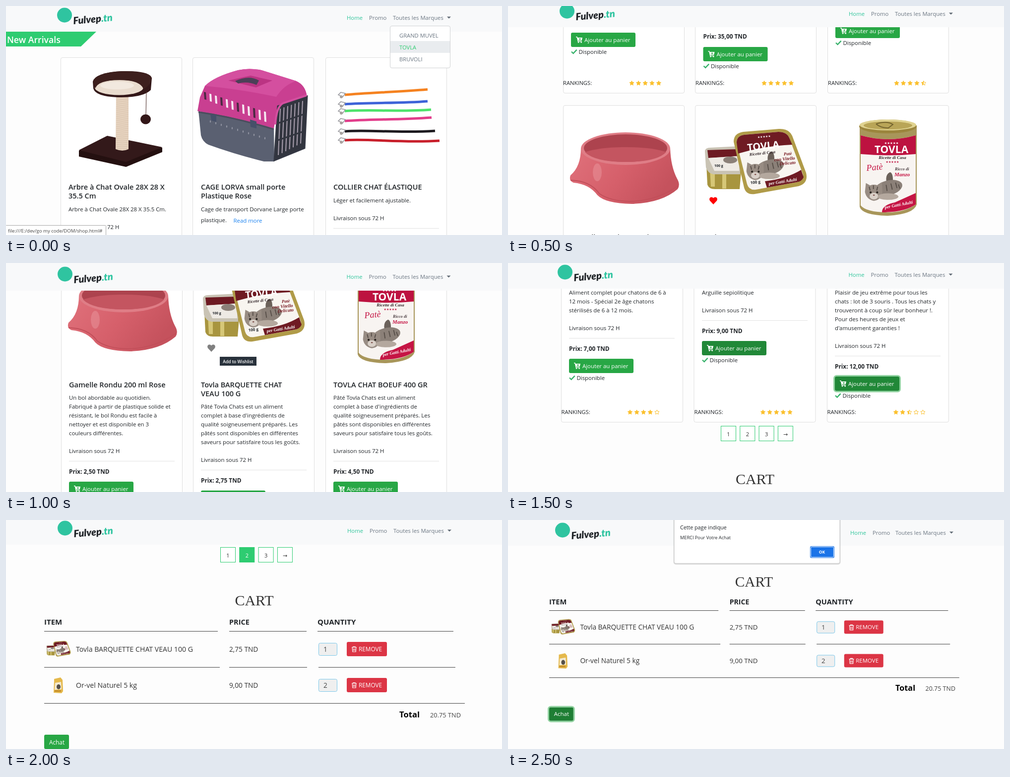
These frames come from a looping animation (1000x464 px, 3000 ms). An HTML page:

```html
<!DOCTYPE html>
<html lang="fr">
<head>
<meta charset="utf-8">
<title>Boutique pour animaux</title>
<style>
  html, body { margin: 0; width: 100%; height: 100%; overflow: hidden; background: #fdfdfd; }
  svg { display: block; width: 1000px; height: 464px; font-family: "Open Sans", "Noto Sans", "DejaVu Sans", sans-serif; fill: #212529; }
</style>
</head>
<body>
<svg id="stage" viewBox="0 0 1000 464"></svg>
<script>
const GREEN = '#28a745', DARK_GREEN = '#218838', MINT = '#2ecc71', TEAL = '#2fc4a0', GOLD = '#fbc02d';
const BOLD = 'font-weight="700"', SEMI = 'font-weight="600"', WHITE = 'fill="#fff"', MIDDLE = 'text-anchor="middle"';
const SERIF = 'font-family="Liberation Serif, serif"';

// Drawing helpers
const text = (x, y, str, size = 11.4, attrs = '') =>
  `<text x="${x}" y="${y}" font-size="${size}" ${attrs}>${str}</text>`;
const lines = (x, y, list, size, attrs) => list.map((s, i) => text(x, y + 18 * i, s, size, attrs)).join('');
const rect = (x, y, w, h, fill, r = 0, attrs = '') =>
  `<rect x="${x}" y="${y}" width="${w}" height="${h}" rx="${r}" fill="${fill}" ${attrs}/>`;
const path = (d, fill, attrs = '') => `<path d="${d}" fill="${fill}" ${attrs}/>`;
const stroke = (d, color, width = 1, attrs = '') => path(d, 'none', `stroke="${color}" stroke-width="${width}" ${attrs}`);
const ellipse = (x, y, rx, ry, fill, attrs = '') =>
  `<ellipse cx="${x}" cy="${y}" rx="${rx}" ry="${ry}" fill="${fill}" ${attrs}/>`;
const move = (x, y, body, more = '') => `<g transform="translate(${x} ${y}) ${more}">${body}</g>`;
const ring = (x, y, w, h) => rect(x - 1.5, y - 1.5, w + 3, h + 3, 'none', 5, 'stroke="#93d3a2" stroke-width="3"');
const repeat = (count, part) => Array.from({ length: count }, (_, i) => part(i)).join('');

// Page parts
function nav(base, height, logoX, homeX = 687) {
  const link = 'fill="#6b7682"', menuX = homeX + (homeX > 689 ? 91 : 93);
  return rect(0, 0, 1000, height, '#f8f9fa') +
    ellipse(logoX, base - 9.5, 15, 15, TEAL) +
    move(logoX + 18, base + 9, `<text font-family="Lato, sans-serif" font-style="italic" font-weight="900" font-size="20">Fulvep<tspan fill="${TEAL}">.tn</tspan></text>`, 'rotate(-5)') +
    text(homeX, base, 'Home', 11.3, 'fill="#2fc59b"') +
    text(homeX + 45, base, 'Promo', 11.3, link) +
    text(menuX, base, 'Toutes les Marques', 11.3, link) +
    path(`M${menuX + 109} ${base - 6.5}h8l-4 4z`, '#5f6973');
}

const card = (x, y, bottom, w = 244) => rect(x + .5, y + .5, w, bottom - y - 1, '#fff', 3.5, 'stroke="#dfdfdf"');

const cartIcon = path('M0 0h2.6l.5 2H13l-1.3 6H4.6l.3 1.2h7v1.3H3.7L1.7 1.4H0z', '#fff') +
  ellipse(5, 11.5, 1.3, 1.3, '#fff') + ellipse(10.7, 11.5, 1.3, 1.3, '#fff') +
  stroke('M8 3v4M6 5h4', GREEN, 1.2);

function buy(x, top, fill = GREEN, focused = false) {
  return (focused ? ring(x, top, 130, 29) : '') + rect(x, top, 130, 29, fill, 3) +
    move(x + 10, top + 8, cartIcon) + text(x + 27, top + 19, 'Ajouter au panier', 11.4, WHITE) +
    stroke(`M${x + 1} ${top + 38.5}l3.6 3.6 7-7.5`, '#38b26b', 2.4) + text(x + 15.5, top + 43, 'Disponible');
}

// Body copy followed by delivery note, rule, price and button
function details(x, y, body, price, fill, focused) {
  const delivery = y + 18 * body.length + 18;
  return lines(x, y, body) + text(x, delivery, 'Livraison sous 72 H') +
    rect(x, delivery + 16, 213, 1, '#e2e2e2') +
    text(x, delivery + 42, `Prix: ${price} TND`, 11.8, BOLD) + buy(x, delivery + 58, fill, focused);
}

const title = (x, y, list) => lines(x, y, list, 14.5, SEMI);

function rating(x, y, score) {
  const outline = Array.from({ length: 10 }, (_, i) => {
    const r = i % 2 ? 2.3 : 4.8, a = Math.PI * (i / 5 - .5);
    return [r * Math.cos(a), r * Math.sin(a)].map(v => v.toFixed(2));
  }).join(' ');
  return text(x, y, 'RANKINGS:', 11.2) + repeat(5, i => {
    const fill = score - i >= 1 ? GOLD : score > i ? 'url(#half)' : 'none';
    return move(x + 138.5 + 13.6 * i, y - 3.5, `<polygon points="${outline}" fill="${fill}" stroke="${GOLD}"/>`);
  });
}

// Product pictures
const catTree =
  path('M147 293l57-29 111 23v9l-73 30-95-21z', '#241010') + path('M147 292l57-29 111 23-73 30z', '#33191a') +
  path('M222 178h25v112q-12 6-26 0z', '#e6d3bf') +
  repeat(27, i => stroke(`M222 ${184 + 4 * i}q12 3 25 0`, '#d3bda7', .8)) +
  path('M175 153Q180 135 234 132Q290 131 294 146L292 170Q276 186 225 185Q180 183 176 167z', '#331718') +
  ellipse(228, 165, 49, 15.5, '#e9dcce') + ellipse(224, 161, 34, 8, '#f2e9df') +
  path('M176 153Q184 134 234 132Q288 132 294 146Q290 163 277 168Q270 150 229 150Q186 150 180 167z', '#3d1f1d') +
  stroke('M283 172l-1 50', '#4a2a26') + ellipse(281.5, 229.5, 10.5, 10, '#331718');

const carrier =
  path('M388 212L393 262Q396 275 408 281Q460 300 520 315H541L540 240z', '#5a6071') +
  path('M386 213L391 185L401 162Q420 143 468 130Q490 125 515 130L585 152Q604 160 607 184L548 205L540 248Q460 224 386 213z', '#c93f91') +
  path('M401 162Q420 143 468 130Q490 125 515 130L585 152Q560 160 545 184Q470 168 401 162z', '#d44f9f') +
  path('M448 151l45-10 44 10-33 14z', '#bb3483') + path('M462 152q28-13 48-1l-5 9q-18-8-37-3z', '#4b4057') +
  repeat(12, i => path(`M${399 + 11 * i} ${174 + 3.6 * i}l4 1 1 ${15 + i * .5}-4-1z`, i % 3 ? '#f6eaf1' : '#4a2a42')) +
  repeat(11, i => ellipse(412 + 11 * i, 234 + 3.4 * i, 1.2, 2.4, '#8f92a0')) +
  stroke('M388 215Q460 225 540 250', '#4b4d5d', 3) +
  path('M412 219l12 2v14l-10-3zM492 230l13 4v14l-12-3z', '#465069') +
  path('M548 203L607 183L602 288L541 313z', '#32353f') +
  repeat(7, i => stroke(`M${553 + 7.5 * i} ${208 - 2.6 * i}l-4 ${94 - 1.3 * i}`, '#a99fae', 2)) +
  stroke('M547 238l57-20M545 273l58-20', '#32353f', 3) + stroke('M548 203L607 183L602 288L541 313z', '#343743', 3) +
  stroke('M543 240Q545 205 558 197L606 181', '#d44f9f', 4);

const collars = [
  ['#f58220', 180, 169, 850], ['#3d63d8', 199, 193, 850], ['#4de36b', 213, 210, 857],
  ['#e23d8b', 233, 226, 858], ['#1d1a1f', 254, 253, 865], ['#c81f2b', 272, 273, 874]
].map(([color, y, end, right]) =>
  stroke(`M683 ${y}C730 ${y - 4} 790 ${end + 5} ${right} ${end}`, color, 5) +
  stroke(`M684 ${y - 3}l-9-2-5 5 9 4z`, '#9b9ba0', 1.6) + ellipse(676, y + 4, 3, 3, '#a8a29f')).join('');

const kitten = path('M14-10Q8-30 20-36Q28-34 26-10z', '#6b615a') +
  ellipse(16, 2, 31, 16, '#8b8078', 'transform="rotate(-15)"') +
  path('M-33 6L-31-13L-22-8Q-14-11-6-8L3-15L4 6Q2 23-14 25Q-30 22-33 6z', '#988c83') +
  ellipse(-14, 15, 9, 7, '#d9d0c8') + ellipse(16, 16, 22, 7, '#b4a89e') +
  stroke('M-24-5l2 8M-15-8v8M-6-5l-2 8M12-9l2 13M22-12l3 13M32-14l3 12M38-10l3 9', '#574e48', 2) +
  ellipse(-21, 7, 2.2, 2.2, '#29231f') + ellipse(-7, 7, 2.2, 2.2, '#29231f') + ellipse(-14, 13, 1.8, 1.3, '#7d4f49');

const label = (x, y, str, size, fill, attrs = '') =>
  text(x, y, str, size, `${SERIF} ${BOLD} font-style="italic" fill="${fill}" ${attrs}`);

const tins =
  path('M400 322l2 40q3 9 15 9h50l5-60z', '#a8953f') + path('M407 330l2 36h8v-34zM432 334h8v36h-8z', '#d6c777') +
  path('M397 295Q397 287 408 287L468 284V341H414Q403 339 399 327z', '#c9c3b4') +
  path('M402 292l63-2v14l-61 4z', '#6d1a22') + path('M404 308l62-4v30h-50z', '#eeeae4') +
  ellipse(448, 312, 14, 7, '#8b8078') + text(416, 326, '100 g', 7, BOLD) +
  path('M455 275Q455 258 474 255L546 249Q566 248 573 263L601 338Q606 359 586 365L497 381Q480 383 476 368z', '#b09b48') +
  path('M461 277Q461 263 476 261L545 255Q562 255 567 267L594 339Q598 354 582 357L500 372Q486 374 482 361z', '#f8f5f0') +
  path('M461 277Q461 263 476 261L545 255Q562 255 567 267L573 281Q520 283 464 299z', '#6f1b23') +
  move(512, 329, kitten, 'scale(.95)') +
  path('M518 355Q562 350 591 332L596 347Q592 356 582 357L522 368z', '#6f1b23') +
  move(483, 294, text(0, 0, 'TOVLA', 20, `${BOLD} ${WHITE}`) + label(3, 10, 'Ricette di Casa', 8.5, '#33272a'), 'rotate(-6)') +
  text(503, 268, '★★★★★', 6, `${WHITE} transform="rotate(-5 503 268)"`) +
  move(556, 303, label(0, 0, 'Patè', 9, '#7a1c25') + label(-20, 10, 'con Vitello', 9.5, '#7a1c25') + label(-10, 19, 'Delicato', 9.5, '#7a1c25'), 'rotate(-5)') +
  text(489, 361, '100 g', 8, `${BOLD} transform="rotate(-6 489 361)"`) +
  label(526, 363, 'per Gatti Adulti', 9, '#fff', 'transform="rotate(-9 526 363)"');

const can =
  path('M709 242V407Q714 424 766 425Q818 422 824 402V242z', '#a8965a') +
  path('M711 262Q766 278 822 262V402Q800 418 766 418Q722 418 711 404z', '#f8f4f1') +
  path('M711 262Q766 278 822 262V300Q766 305 711 300z', '#bd1240') +
  move(751, 371, kitten, 'scale(.95)') +
  path('M754 418Q754 403 780 398L822 379V402Q800 418 754 418z', '#c51544') +
  ellipse(766, 244, 58, 14, '#9b853d') + ellipse(766, 241, 57, 11, '#e0d391') + ellipse(766, 242, 49, 8, '#b9a557') +
  stroke('M742 239q22-7 34 1l-9 7q-16 0-25-8', '#75652f', 2) +
  text(773, 280, '★★★★★', 6.5, `${WHITE} ${MIDDLE}`) +
  text(773, 298, 'TOVLA', 21, `${BOLD} ${WHITE} ${MIDDLE}`) +
  label(775, 310, 'Ricette di Casa', 9, '#33272a', MIDDLE) + text(775, 318, '★★★★★', 6, `fill="#bd1240" ${MIDDLE}`) +
  text(723, 334, 'Patè', 18, `${SERIF} font-style="italic" fill="#c51544" transform="rotate(-5 723 334)"`) +
  label(780, 333, 'Ricco di', 8.5, '#4d4144') + label(779, 345, 'Manzo', 11, '#c51544') +
  label(760, 411, 'per Gatti Adulti', 9, '#fff', 'transform="rotate(-11 760 411)"');

const bowl =
  path('M147 288Q147 325 126 343Q122 354 132 358Q164 361 180 383Q196 400 250 401Q310 399 342 371Q348 362 341 350Q328 325 327 288z', 'url(#rose)') +
  ellipse(237, 289, 90, 33, '#df7d86') + ellipse(237, 288, 84, 28, '#ad434e') +
  path('M155 296Q190 285 237 286Q290 286 319 296Q300 316 237 316Q175 316 155 296z', '#c45560') +
  stroke('M126 353Q166 354 184 380Q205 395 245 396Q300 395 343 364', '#c24e59', 2) +
  ellipse(180, 337, 9, 18, '#eb9ba1', 'opacity=".45"');

const heart = fill => path('M414 402l-7-7.5q-2.200-4 1-6.700 3.500-1.800 6 1.500 2.500-3.300 6-1.500 3.200 2.700 1 6.700z', fill);

const pate = ["Pâté Tovla Chats est un aliment", "complet à base d'ingrédients de", 'qualité soigneusement préparés. Les',
  'pâtés sont disponibles en différentes', 'saveurs pour satisfaire tous les goûts.'];

const secondRow = heartColor =>
  [111, 377, 644].map(x => card(x, 201, 900)).join('') + bowl + tins + can + heart(heartColor) +
  title(127, 474, ['Gamelle Rondu 200 ml Rose']) +
  details(127, 499, ['Un bol abordable au quotidien.', 'Fabriqué à partir de plastique solide et',
    'résistant, le bol Rondu est facile à', 'nettoyer et est disponible en 3', 'couleurs différentes.'], '2,50') +
  title(393, 474, ['Tovla BARQUETTE CHAT', 'VEAU 100 G']) + details(393, 517, pate, '2,75') +
  title(660, 474, ['TOVLA CHAT BOEUF 400 GR']) + details(660, 499, pate, '4,50');

const pages = (x, y, active) => ['1', '2', '3', '→'].map((s, i) => {
  const left = x + 38.3 * i, on = i === active;
  return rect(left + .5, y + .5, 30, 30, on ? MINT : '#fff', 0, `stroke="${MINT}"`) +
    text(left + 15.5, y + 20.5, s, 11, `${MIDDLE} fill="${on ? '#fff' : '#333'}"`);
}).join('');

const bag = path('M-8-13l13-3 4 5 1 23-3 4-16-1 1-24z', '#e5b94c') + path('M-6-5l12-2 1 15-14 1z', '#f3ead2') +
  ellipse(1, 3, 4, 5, '#55504a') + rect(-7, 10, 13, 3, '#c58e2b');

// Cart table; left/top and kx/ky place it on the page
function cart(left, top, kx, ky, paid) {
  const X = x => left + (x - 77) * kx, Y = y => top + (y - 225) * ky;
  const put = (x, y, str, size, attrs) => text(X(x), Y(y), str, size * kx, attrs);
  const box = (x, y, w, h, ...rest) => rect(X(x), Y(y), w * kx, h * ky, ...rest);
  const rule = (y, ...spans) => spans.map(([a, b]) => rect(X(a), Math.round(Y(y)), (b - a) * kx, 1, '#444')).join('');
  const trash = stroke('M0 2h10M3 2V.5h4V2M1.2 2.5l.6 8.5h6.4l.6-8.5M3.7 4.5V9M6.3 4.5V9', '#fff', 1.2);
  const row = (y, name, price, count) =>
    put(141, y, name, 14.1, 'fill="#333"') + put(450, y, price + ' TND', 13.7, 'fill="#333"') +
    box(630.5, y - 17.5, 37, 25, '#efefef', 3, 'stroke="#7cc8ea"') + put(640, y, count, 13.7, 'fill="#444"') +
    box(687, y - 20, 81, 29, '#dc3545', 3) + move(X(697), Y(y - 11), trash) +
    put(711, y - 1, 'REMOVE', 11.8, WHITE);
  const achat = [X(77), Y(435) + (paid ? 1 : 0), 50 * kx, 29 * ky];
  return put(500.5, 173, 'CART', 30, `${SERIF} ${MIDDLE} fill="#333"`) +
    put(77, 212, 'ITEM', 15, BOLD) + put(450, 212, 'PRICE', 14.5, BOLD) + put(628, 212, 'QUANTITY', 15, BOLD) +
    rule(225, [77, 427], [450, 606], [628, 902]) + rule(298, [77, 431], [450, 607], [630, 906]) + rule(371, [77, 925]) +
    row(267, 'Tovla BARQUETTE CHAT VEAU 100 G', '2,75', 1) + row(340, 'Or-vel Naturel 5 kg', '9,00', 2) +
    move(X(106), Y(261), move(-500, -316, tins), `scale(${.24 * kx})`) + move(X(105), Y(335), bag, `scale(${kx})`) +
    put(793, 400, 'Total', 16.6, `${BOLD} fill="#000"`) + put(855, 400, '20.75 TND', 12.8, 'fill="#444"') +
    (paid ? ring(...achat) : '') + rect(...achat, paid ? '#1e7e34' : GREEN, 3) + put(87, 455, 'Achat', 11.8, WHITE);
}

const scenes = [
  // New arrivals with the brand menu open
  [110, 376, 644].map(x => card(x, 104, 600)).join('') + catTree + carrier + collars +
  title(126, 372, ['Arbre à Chat Ovale 28X 28 X', '35.5 Cm']) + lines(126, 416, ['Arbre à Chat Ovale 28X 28 X 35.5 Cm.', '', 'Livraison sous 72 H']) +
  title(393, 372, ['CAGE LORVA small porte', 'Plastique Rose']) +
  text(393, 416, 'Cage de transport Dorvane Large porte') + text(393, 438, 'plastique.') + text(458.5, 439, 'Read more', 11.4, 'fill="#1a82f0"') +
  title(660, 372, ['COLLIER CHAT ÉLASTIQUE']) + lines(660, 398, ['Léger et facilement ajustable.', '', 'Livraison sous 72 H']) +
  rect(660, 450, 213, 1, '#e2e2e2') +
  nav(28, 52, 118) + path('M0 52H182L151 82H0z', MINT) + text(2, 75, 'New Arrivals', 17.7, `${SEMI} ${WHITE}`) +
  rect(774.5, 40.5, 121, 85, '#fff', 3.5, 'stroke="#d0d2d4"') + rect(775, 71, 120, 24, '#e9ecef') +
  text(793, 64, 'GRAND MUVEL', 11.2, 'fill="#6b7682"') + text(793, 88, 'TOVLA', 11.2, `fill="${MINT}"`) +
  text(793, 112, 'BRUVOLI', 11.2, 'fill="#6b7682"') +
  rect(-.5, 444.5, 202, 24, '#fff', 1, 'stroke="#a8a8a8"') +
  text(4, 459, 'file:///E:/dev/go my code/DOM/shop.html#', 9.6, 'fill="#444"'),

  // Scrolled to the second row
  [111, 377, 644].map(x => card(x, -50, 177)).join('') +
  buy(127, 54) + text(393.5, 66, 'Prix: 35,00 TND', 11.8, BOLD) + buy(393.5, 83) + buy(660, 36) +
  rating(111, 160, 5) + rating(378, 160, 5) + rating(645, 160, 4.5) + secondRow('#f00') + nav(20, 43, 119),

  // Second row descriptions with the wishlist hint
  move(0, -222, secondRow('#808080')) + rect(431, 190, 74, 18, '#28313b') +
  text(468, 202.5, 'Add to Wishlist', 8.5, `${SEMI} ${WHITE} ${MIDDLE}`) + nav(32, 56, 119, 686.5),

  // Last row and pagination
  [107, 374.5, 643].map(x => card(x, -50, 323, 245)).join('') +
  details(123, 64, ['Aliment complet pour chatons de 6 à', '12 mois - Spécial 2e âge chatons', 'stérilisés de 6 à 12 mois.'], '7,00') +
  details(391, 64, ['Arguille sepiolitique'], '9,00', DARK_GREEN) +
  details(659, 64, ['Plaisir de jeu extrême pour tous les', 'chats : lot de 3 souris . Tous les chats y',
    'trouveront à coup sûr leur bonheur !.', 'Pour des heures de jeux et', "d'amusement garanties !"], '12,00', DARK_GREEN, true) +
  rating(107.5, 306, 4) + rating(375.5, 306, 5) + rating(643.5, 306, 2.5) + pages(429, 330) +
  text(498, 448, 'CART', 30, `${SERIF} ${MIDDLE} fill="#333"`) + nav(28, 52, 115, 686.5),

  // Cart
  pages(432, 55, 1) + cart(77, 225, 1, 1, false) + nav(26, 50, 119, 688),

  // Purchase confirmed
  cart(83, 183, .975, .932, true) + nav(30, 52, 110, 690) +
  rect(333.5, -8, 337, 98.5, '#000', 5, 'opacity=".12"') + rect(335, -8, 334, 96, '#fff', 3, 'stroke="#c4c4c4"') +
  text(347, 19, 'Cette page indique', 10.7) + text(347, 39, 'MERCI Pour Votre Achat', 9.2) +
  rect(609, 53, 49, 24, '#1a73e8', 3) + rect(610.5, 54.5, 46, 21, '#1a73e8', 2, 'stroke="#fff"') +
  text(633, 68, 'OK', 8.5, `${BOLD} ${WHITE} ${MIDDLE}`)
];

const stage = document.getElementById('stage');
stage.innerHTML = `<defs>
  <linearGradient id="half"><stop offset=".5" stop-color="${GOLD}"/><stop offset=".5" stop-color="#fff"/></linearGradient>
  <linearGradient id="rose" x2="1" y2=".4"><stop stop-color="#e0727c"/><stop offset=".55" stop-color="#d6606b"/><stop offset="1" stop-color="#c5525d"/></linearGradient>
</defs>` + rect(0, 0, 1000, 464, '#fdfdfd') + scenes.map(s => `<g class="scene">${s}</g>`).join('');

const groups = stage.querySelectorAll('.scene');
function draw() {
  const current = Math.floor(performance.now() % 3000 / 500);
  groups.forEach((g, i) => g.style.display = i === current ? '' : 'none');
  requestAnimationFrame(draw);
}
draw();
</script>
</body>
</html>
```
